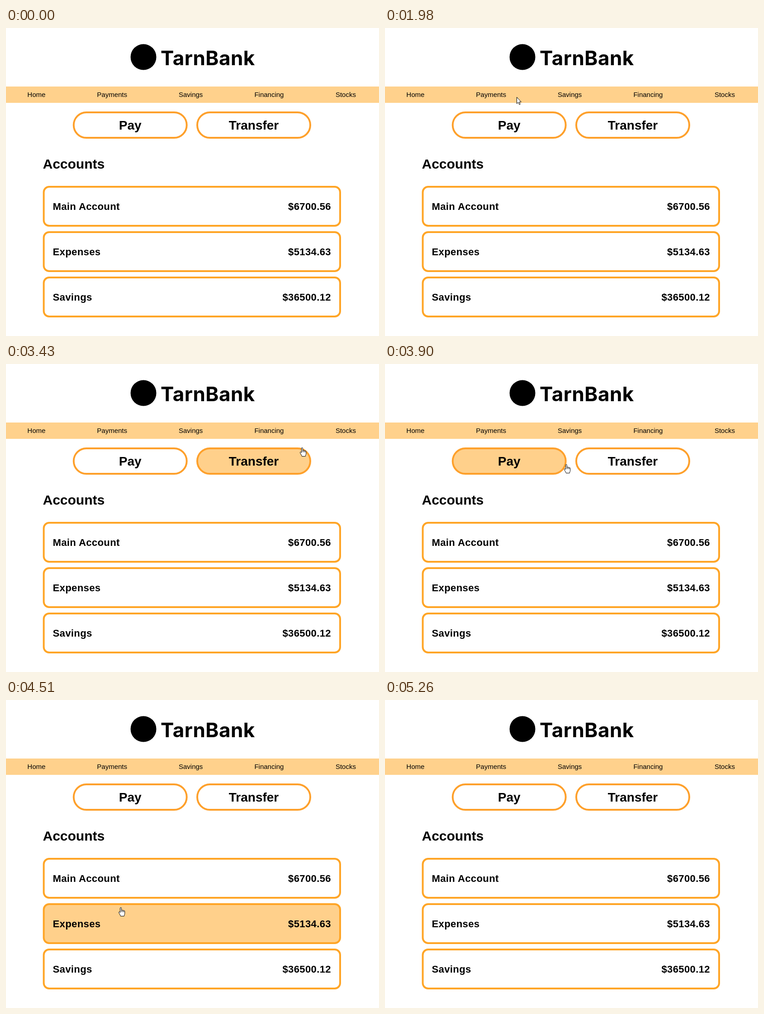
Animation of 825x679 px, one loop 6720 ms. Source, as an HTML page:

```html
<!DOCTYPE html>
<html lang="en">
<head>
<meta charset="utf-8">
<title>Bank overview</title>
<style>
  html, body { margin: 0; width: 100%; height: 100%; overflow: hidden; background: #fff; }
  svg { display: block; width: 100%; height: 100%; font-family: "Liberation Sans", Arial, sans-serif; }
  .brand { font: 700 44px Inter, sans-serif; letter-spacing: .5px; }
  .bar { fill: #ffd18c; }
  .link { font-size: 15px; }
  .link.on { text-decoration: underline; }
  .box { fill: #fff; stroke: #ffa526; stroke-width: 4; }
  .pill { stroke: #fea02b; }
  .on .box { fill: #ffd08b; }
  .big { font-size: 28px; font-weight: 700; text-anchor: middle; }
  .title { font-size: 30px; font-weight: 700; }
  .row { font-size: 22px; font-weight: 700; letter-spacing: .4px; }
  .sum { text-anchor: end; }
  .pointer { fill: #fff; stroke: #000; stroke-width: 1; stroke-linejoin: round; }
</style>
</head>
<body>
<svg id="stage" viewBox="0 0 825 679">
  <circle cx="304" cy="64" r="28.5"/>
  <text class="brand" x="342" y="82">TarnBank</text>
  <rect class="bar" y="129" width="825" height="36"/>
  <text class="title" x="81.5" y="310">Accounts</text>
  <g id="ui"></g>
  <g id="cursor" class="pointer">
    <path id="arrow" d="M.5 .5V14.8L3.7 11.8 6.1 16.9 8.2 16 5.9 11H10.3Z"/>
    <g id="hand">
      <path d="M-1.5 11.5V1.9a1.4 1.4 0 0 1 2.8 0V7C1.5 5.6 4 5.6 4 7.4 4.2 6 6.4 6.2 6.5 8 6.9 6.9 8.7 7.2 8.7 9V13.5C8.7 16 7.4 17 7.2 19.5H-.6C-.8 17.5-3 15-4.4 11.8-5.2 9.8-3 8.8-1.5 11.5Z"/>
      <path fill="none" d="M1.3 7v3.5M4 7.4v3.1M6.5 8v2.5"/>
    </g>
  </g>
</svg>
<script>
const LOOP = 6720;
const $ = id => document.getElementById(id);
const targets = [];

function add(parent, tag, attrs, text = '') {
  const el = document.createElementNS('http://www.w3.org/2000/svg', tag);
  for (const key in attrs) el.setAttribute(key, attrs[key]);
  el.textContent = text;
  return parent.appendChild(el);
}

function hotspot(el, x, y, w, h) {
  targets.push({ el, hit: (px, py) => px >= x && px <= x + w && py >= y && py <= y + h });
}

function link(label, x, w) {
  hotspot(add($('ui'), 'text', { class: 'link', x, y: 152 }, label), x, 138, w, 18);
}

function button(label, x) {
  const g = add($('ui'), 'g', {});
  add(g, 'rect', { class: 'box pill', x, y: 186, width: 250, height: 56, rx: 28 });
  add(g, 'text', { class: 'big', x: x + 125, y: 223.5 }, label);
  hotspot(g, x - 2, 184, 254, 60);
}

function account(name, sum, y, slack = 0) {
  const g = add($('ui'), 'g', {});
  add(g, 'rect', { class: 'box', x: 83.5, y: y + 2, width: 655.5, height: 86, rx: 12 });
  add(g, 'text', { class: 'row', x: 103.5, y: y + 52.5 }, name);
  add(g, 'text', { class: 'row sum', x: 719, y: y + 52.5 }, sum);
  hotspot(g, 81.5, y, 659.5, 90 + slack);
}

link('Home', 47.3, 40);
link('Payments', 201.3, 67);
link('Savings', 382, 53.5);
link('Financing', 549.4, 65);
link('Stocks', 728.9, 45);
button('Pay', 149.7);
button('Transfer', 423);
account('Main Account', '$6700.56', 348);
account('Expenses', '$5134.63', 448);
account('Savings', '$36500.12', 548, 20); // highlight lingers below the box

// [time in ms, tick]: the pointer is sampled at uneven ticks
const clock = [[300, 0], [920, 9], [990, 10], [1120, 12], [1200, 13], [1650, 19], [1720, 20],
  [1980, 24], [2050, 25], [2390, 30], [2470, 31], [3070, 40], [3150, 41], [3430, 45], [3500, 46],
  [3770, 50], [3840, 51], [4300, 58], [4370, 59], [4510, 61], [4580, 62], [5190, 71], [5260, 72]];

// [tick, x, y] along the pointer's path
const path = [[0, 795, 622], [2, 772, 450], [3, 746, 335], [4, 640, 275], [6, 372, 228], [8, 170, 200],
  [9, 107, 175], [12, 78, 157], [15, 53, 145], [17, 110, 150], [19, 205, 157], [21, 238, 150],
  [24, 291, 152], [27, 358, 150], [30, 424, 150], [32, 470, 146], [36, 596, 138], [40, 734, 135],
  [42, 772, 143], [45, 655, 184], [47, 555, 203], [50, 442, 218], [53, 320, 226], [55, 268, 242],
  [58, 241, 346], [61, 254, 457], [64, 261, 548], [68, 264, 606], [71, 264, 654]];

function tickAt(ms) {
  const i = clock.findIndex(([t]) => t > ms);
  if (i < 1) return -1;
  const [t0, k0] = clock[i - 1], [t1, k1] = clock[i];
  return Math.floor(k0 + (ms - t0) / (t1 - t0) * (k1 - k0) + 1e-6);
}

// Cubic Hermite through the path points
function pointAt(tick) {
  const i = Math.min(path.findLastIndex(p => p[0] <= tick), path.length - 2);
  const a = path[i], b = path[i + 1];
  const before = path[i - 1] || a, after = path[i + 2] || b;
  const span = b[0] - a[0], u = (tick - a[0]) / span;
  const u2 = u * u, u3 = u2 * u;
  return [1, 2].map(c => {
    const va = (b[c] - before[c]) / (b[0] - before[0]) * span;
    const vb = (after[c] - a[c]) / (after[0] - a[0]) * span;
    return (2 * u3 - 3 * u2 + 1) * a[c] + (u3 - 2 * u2 + u) * va
      + (3 * u2 - 2 * u3) * b[c] + (u3 - u2) * vb;
  });
}

function draw(ms) {
  const tick = tickAt(ms);
  const shown = tick >= 0;
  const [x, y] = shown ? pointAt(tick).map(Math.round) : [-99, -99];
  let over = false;
  for (const { el, hit } of targets) {
    const on = hit(x, y);
    el.classList.toggle('on', on);
    over = over || on;
  }
  $('cursor').style.display = shown ? '' : 'none';
  $('cursor').setAttribute('transform', `translate(${x} ${y})`);
  $('arrow').style.display = over ? 'none' : '';
  $('hand').style.display = over ? '' : 'none';
}

const start = performance.now();
function frame() {
  draw((performance.now() - start) % LOOP);
  requestAnimationFrame(frame);
}
frame();
</script>
</body>
</html>
```
